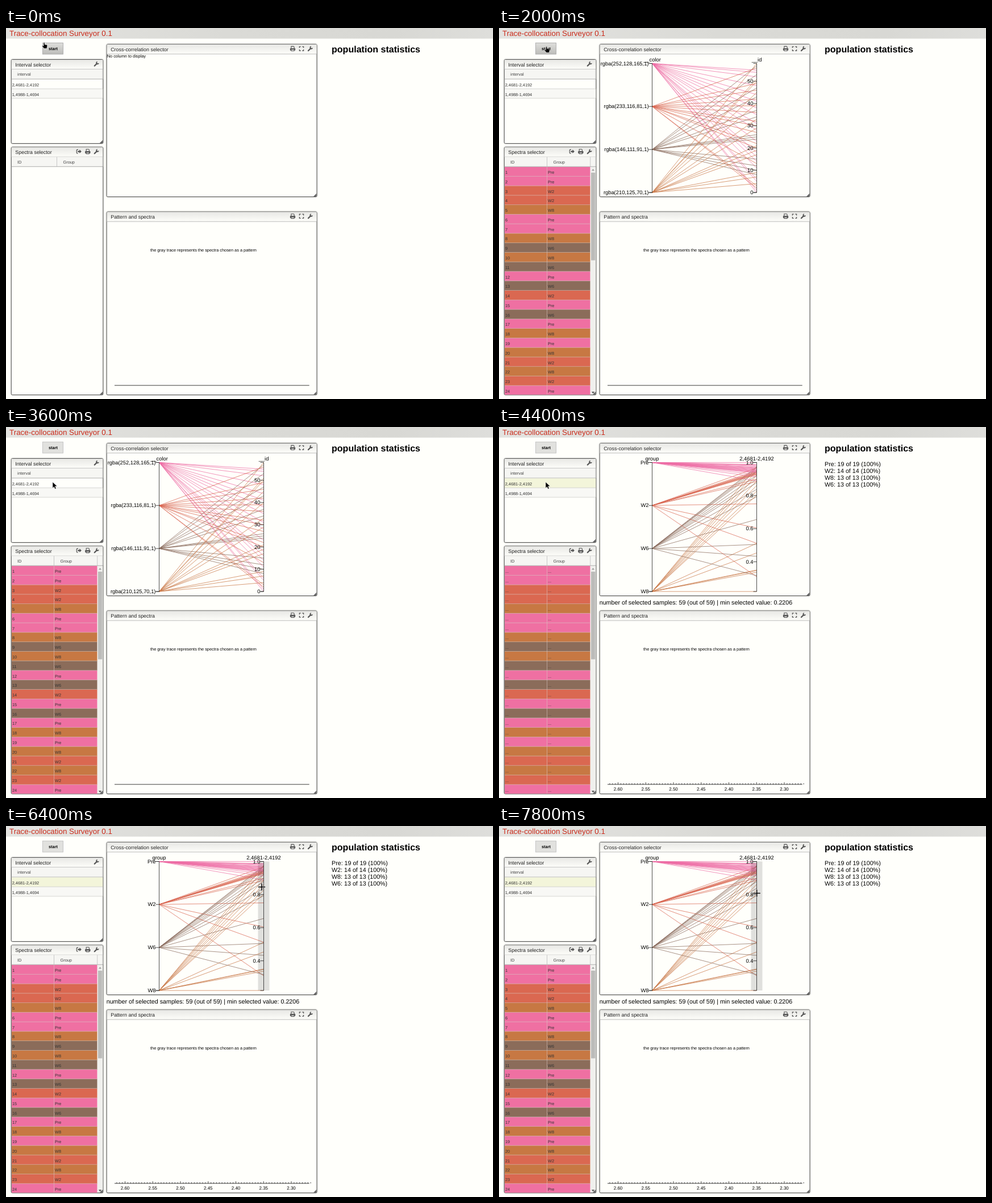
Write an HTML page that moves like this. It is 857 by 654 pixels and loops after 8 s.

```html
<!DOCTYPE html>
<html lang="en">
<head>
<meta charset="utf-8">
<title>Trace-collocation Surveyor</title>
<style>
  html, body { margin: 0; width: 100%; height: 100%; overflow: hidden; background: #fffffb; }
  svg { display: block; }
  text { font-family: "Liberation Sans", Arial, sans-serif; white-space: pre; text-rendering: geometricPrecision; }
</style>
</head>
<body>
<svg id="stage" width="857" height="654" viewBox="0 0 857 654"></svg>
<script>
const SCALE = 0.6695;
const LOOP = 8000;

const GROUPS = {
  P: { name: 'Pre', row: '#ef70a2', line: '#ee6ba4', y: 62.5 },
  2: { name: 'W2', row: '#da6851', line: '#d96550', y: 138.3 },
  6: { name: 'W6', row: '#8b6c5a', line: '#88695a', y: 214.2 },
  8: { name: 'W8', row: '#c77843', line: '#c87646', y: 290 },
};
const SAMPLES = 'PP228PP8686P62P6P8P8282P6662P82P286P26P28P26P826P288P6PP268';

// Heights where each group's lines meet the correlation axis.
const ENDS = {
  P: [66, 72, 68, 62.5, 75, 79, 67, 71, 81, 73, 76, 95, 69.5, 78, 84, 74, 88, 80, 77],
  2: [77, 135.5, 82, 80, 178, 72, 205, 84, 79, 264, 92, 81, 96, 83],
  6: [72, 163, 75, 207, 92, 70, 123, 228, 78, 262, 85, 98, 110],
  8: [252, 70, 205, 95, 290, 77, 222, 113, 253, 85, 256, 120, 103],
};

// start time, pointer kind, x, y
const POINTER = [
  [0, 'hand', 62.5, 25], [600, 'hand', 79, 32.3], [3000, 'hand', 79, 34.3],
  [3200, 'arrow', 81.5, 85], [3400, 'arrow', 82, 90], [3600, 'arrow', 82, 97],
  [5600, 'arrow', 203, 133], [5800, 'arrow', 365.5, 103.3], [6200, 'arrow', 421.5, 102.8],
  [6400, 'cross', 450, 107.5], [6600, 'cross', 460.8, 109.5], [6800, 'cross', 460.5, 112.5],
  [7000, 'cross', 458.5, 112.7], [7200, 'cross', 454.5, 115.5], [7400, 'cross', 454.3, 117.3],
  [7600, 'cross', 453.5, 117.7], [7800, 'cross', 453.7, 118.5],
];

const ICONS = {
  wrench: '<path d="M-3.5 3.6L.8-.7" stroke-width="2.3" stroke-linecap="round"/>' +
          '<path d="M3.7-1.2A2 2 0 1 1 1.3-3.7" stroke-width="1.7"/>',
  printer: '<path d="M-2.6-.5V-4H1.6L2.6-3V-.5M-2.6 1.4V3.9H2.6V1.4Z" stroke-width="1.1"/>' +
           '<path d="M-2.6 2.4H-3.8V.2H3.8V2.4H2.6" stroke-width="1.6"/>',
  expand: '<path d="M-3.6-1.3V-3.6H-1.3M1.3-3.6H3.6V-1.3M3.6 1.3V3.6H1.3M-1.3 3.6H-3.6V1.3" stroke-width="1.3"/>',
  leave: '<path d="M-1.3-3.3H-3Q-4-3.3-4-2.3V2.3Q-4 3.3-3 3.3H-1.3" stroke-width="1.2"/>' +
         '<path d="M-2-1.2H1V-3.4L4.6 0L1 3.4V1.2H-2Z" fill="#555" stroke="none"/>',
};

const text = (x, y, s, size = 11, attrs = '') =>
  `<text x="${x}" y="${y}" font-size="${size * SCALE}" ${attrs}>${s}</text>`;
const rect = (x, y, w, h, fill, attrs = '') =>
  `<rect x="${x}" y="${y}" width="${w}" height="${h}" fill="${fill}" ${attrs}/>`;
const path = (d, stroke, width = 0.8, attrs = '') =>
  `<path d="${d}" fill="none" stroke="${stroke}" stroke-width="${width}" ${attrs}/>`;
const group = (id, ...parts) => `<g id="${id}">${parts.join('')}</g>`;
const END = 'text-anchor="end"', MIDDLE = 'text-anchor="middle"', GREY = 'fill="#444"';

function panel(x, y, w, h, title, icons) {
  const right = x + w, bottom = y + h;
  return rect(x, y, w, h, '#fffffb', 'rx="2" stroke="#555" filter="url(#shadow)"') +
    rect(x + .5, y + .5, w - 1, 16.5, 'url(#bar)') +
    path(`M${x} ${y + 17.2}H${right}`, '#aaa') +
    text(x + 7, y + 12, title, 13.333, 'fill="#222"') +
    icons.map((name, i) => `<g transform="translate(${right - 11.5 - 15.5 * (icons.length - 1 - i)} ${y + 7.7})"
      fill="none" stroke="#555">${ICONS[name]}</g>`).join('') +
    `<path d="M${right - .5} ${bottom - 6}V${bottom - .5}H${right - 6}Z" fill="#666"/>`;
}

const columnBar = (y, dividers) =>
  rect(10, y, 160.5, 16.6, '#f6f6f3') + path(`M9.5 ${y + 17}H170.5`, '#999') +
  dividers.map(x => path(`M${x} ${y}V${y + 17}`, '#bbb')).join('');

function axis(x, ticks) {
  return path(`M${x - 6} 62.5H${x}V290H${x - 6}`, '#222') +
    ticks.map(([y, label]) => path(`M${x - 6} ${y}H${x}`, '#222') +
      text(x - 6, y + 3.1, label, 14, END)).join('');
}

function parallelLines(endOf) {
  return [...SAMPLES].map((key, i) =>
    path(`M269.5 ${GROUPS[key].y}L453.5 ${endOf(key, i)}`, GROUPS[key].line, 1, 'opacity=".72"')).join('');
}

function idChart() {
  const colors = ['252,128,165', '233,116,81', '146,111,91', '210,125,70'];
  const left = ['P', '2', '6', '8'].map((key, i) => [GROUPS[key].y, `rgba(${colors[i]},1)`]);
  const step = 227.5 / 58;
  const right = [0, 10, 20, 30, 40, 50].map(v => [290 - v * step, v]);
  return parallelLines((key, i) => 290 - i * step) + axis(269.5, left) + axis(453.5, right) +
    text(269.5, 58.5, '__color', 14, MIDDLE) + text(453.5, 58.5, '__id', 14, MIDDLE);
}

function correlationChart() {
  const used = { P: 0, 2: 0, 6: 0, 8: 0 };
  const left = Object.values(GROUPS).map(g => [g.y, g.name]);
  const right = [1, .8, .6, .4].map(v => [62.5 + (1 - v) * 291.9, v.toFixed(1)]);
  return parallelLines(key => ENDS[key][used[key]++]) + axis(269.5, left) + axis(453.5, right) +
    text(269.5, 58.5, 'group', 14, MIDDLE) + text(453.5, 58.5, '2,4681-2,4192', 14, MIDDLE);
}

function spectraRows() {
  let cells = '', values = '', dots = '';
  for (let i = 0; i < 24; i++) {
    const y = 244.9 + i * 16.77, g = GROUPS[SAMPLES[i]];
    cells += rect(10, y, 150.5, 16.8, g.row) + path(`M10 ${y + 16.5}H160.5`, '#cfc3bd', .7);
    values += text(11, y + 12.2, i + 1, 11, 'fill="#333"') + text(86, y + 12.2, g.name, 11, 'fill="#333"');
    dots += text(11, y + 12.2, '...', 11, 'fill="#333"') + text(86, y + 12.2, '...', 11, 'fill="#333"');
  }
  cells += path('M84.5 245V646', '#d6c4c0', .6);
  return `<g clip-path="url(#rows)">${cells}${group('values', values)}${group('dots', dots)}</g>`;
}

function spectrumTicks() {
  let out = '';
  for (let i = 0; i <= 70; i++) {
    const x = 194.9 + i * 4.875, major = i % 10 === 3;
    out += path(`M${x} 630V${major ? 626.2 : 628}`, '#222');
    if (major) out += text(x, 641, (2.615 - i * .005).toFixed(2), 12, MIDDLE);
  }
  return out;
}

const stats = ['Pre: 19 of 19', 'W2: 14 of 14', 'W8: 13 of 13', 'W6: 13 of 13']
  .map((s, i) => text(573, 68.5 + i * 12.05, s + ' (100%)', 16)).join('');

const stage = document.getElementById('stage');
stage.innerHTML = `<defs>
    <linearGradient id="bar" x2="0" y2="1"><stop stop-color="#e8e8e5"/><stop offset="1" stop-color="#fdfdf9"/></linearGradient>
    <linearGradient id="top"><stop stop-color="#e3e3e0"/><stop offset=".45" stop-color="#dadad6"/>
      <stop offset=".8" stop-color="#d8d8d4"/><stop offset="1" stop-color="#dededb"/></linearGradient>
    <linearGradient id="press" x2="0" y2="1"><stop stop-color="#dededb"/><stop offset="1" stop-color="#bdbdba"/></linearGradient>
    <filter id="shadow"><feDropShadow dx="0" dy="0" stdDeviation=".8" flood-opacity=".35"/></filter>
    <clipPath id="rows"><rect x="10" y="244.5" width="151" height="402"/></clipPath>
  </defs>` + [
  rect(0, 0, 857, 654, '#fffffb'),
  rect(0, 0, 857, 18.7, 'url(#top)'),
  text(6, 14.2, 'Trace-collocation Surveyor 0.1', 20, 'fill="#ca2c1c"'),
  rect(64.5, 26.3, 36, 19.7, '#e1e1de', 'stroke="#bbb" stroke-width=".8"'),
  group('pressed', rect(64.5, 26.3, 36, 19.7, 'url(#press)', 'stroke="#aaa" stroke-width=".8"')),
  text(83, 38.8, 'start', 11, MIDDLE + ' font-weight="bold"'),

  panel(9.3, 55.5, 161.5, 148, 'Interval selector', ['wrench']),
  columnBar(73, [170]),
  group('headerHover', rect(10, 79, 160, 10.7, '#e9e9e6')),
  text(20, 84, 'interval', 11, GREY),
  group('selected', rect(10, 90.6, 160.3, 16.4, '#f3f5da')),
  rect(10, 107.3, 160.3, 16.4, '#f8f8f5'),
  path('M10 107.2H170.3M10 123.9H170.3', '#c4c4c2', .7),
  text(10.7, 102.8, '2,4681-2,4192', 11, 'fill="#333"'),
  text(10.7, 119.6, '1,4988-1,4694', 11, 'fill="#333"'),

  panel(9.3, 210, 161.5, 436.7, 'Spectra selector', ['leave', 'printer', 'wrench']),
  group('emptyTable', columnBar(227.3, [89.5, 170]), text(100.5, 238.6, 'Group', 11, GREY)),
  group('table', columnBar(227.3, [84.5, 160.7, 170]), text(95.5, 238.6, 'Group', 11, GREY),
    spectraRows(),
    rect(161, 245, 9.3, 401, '#f0f0ed'), rect(162, 255, 7.3, 154.5, '#bcbcba'),
    '<path d="M163 251.5h5l-2.5-3z" fill="#999"/><path d="M163 641.3h5l-2.5 3z" fill="#444"/>',
    '<path d="M170.3 640.7V646.2H164.8Z" fill="#666"/>'),
  text(20, 238.6, 'ID', 11, GREY),

  panel(177.2, 28.7, 369.8, 268.8, 'Cross-correlation selector', ['printer', 'expand', 'wrench']),
  group('noColumn', text(177.7, 52.3, 'No column to display')),
  group('idChart', idChart()),
  group('results', correlationChart(), stats, spectrumOutput()),

  panel(177.2, 324, 369.8, 322.7, 'Pattern and spectra', ['printer', 'expand', 'wrench']),
  text(254, 394.2, 'the gray trace represents the spectra chosen as a pattern'),
  path('M191 630H533.7', '#222', .9),
  group('ticks', spectrumTicks()),
  group('brush', rect(443.5, 62.5, 20, 227.5, '#000', 'opacity=".12"')),
  text(573, 43, 'population statistics', 24, 'font-weight="bold"'),

  '<path id="hand" d="M3.7 1Q4.7 0 5.5 1.1V4L9.4 4.8Q10.4 5.2 10 7L9.2 11H4.6L1.2 7.1Q1 5.8 2.2 6L3.7 6.9Z" stroke="#fff" stroke-width=".4"/>',
  '<path id="arrow" d="M0 0V10.6L2.5 8.4L4.3 12.2L6.2 11.4L4.5 7.6H8Z" stroke="#fff" stroke-width=".5"/>',
  `<g id="cross">${path('M-6.8 0H6.8M0-6.8V6.8', '#fff', 2.6, 'opacity=".6"')}${path('M-6.2 0H6.2M0-6.2V6.2', '#000', 1.5)}</g>`,
].join('');

function spectrumOutput() {
  return text(176.7, 313, 'number of selected samples: 59 (out of 59) | min selected value: 0.2206', 16);
}

function show(id, visible) {
  document.getElementById(id).style.display = visible ? '' : 'none';
}

function render(t) {
  const started = t >= 2000, chosen = t >= 4400, loading = chosen && t < 4600;
  show('pressed', t < 3200);
  show('headerHover', t >= 3200 && t < 3400);
  show('emptyTable', !started);
  show('noColumn', !started);
  show('table', started);
  show('idChart', started && !chosen);
  show('selected', chosen);
  show('results', chosen);
  show('ticks', chosen);
  show('values', !loading);
  show('dots', loading);
  show('brush', t >= 6400);

  const [, kind, x, y] = POINTER.findLast(step => step[0] <= t);
  for (const id of ['hand', 'arrow', 'cross']) show(id, id === kind);
  document.getElementById(kind).setAttribute('transform', `translate(${x} ${y})`);
}

function loop() {
  render(performance.now() % LOOP);
  requestAnimationFrame(loop);
}
loop();
</script>
</body>
</html>
```
